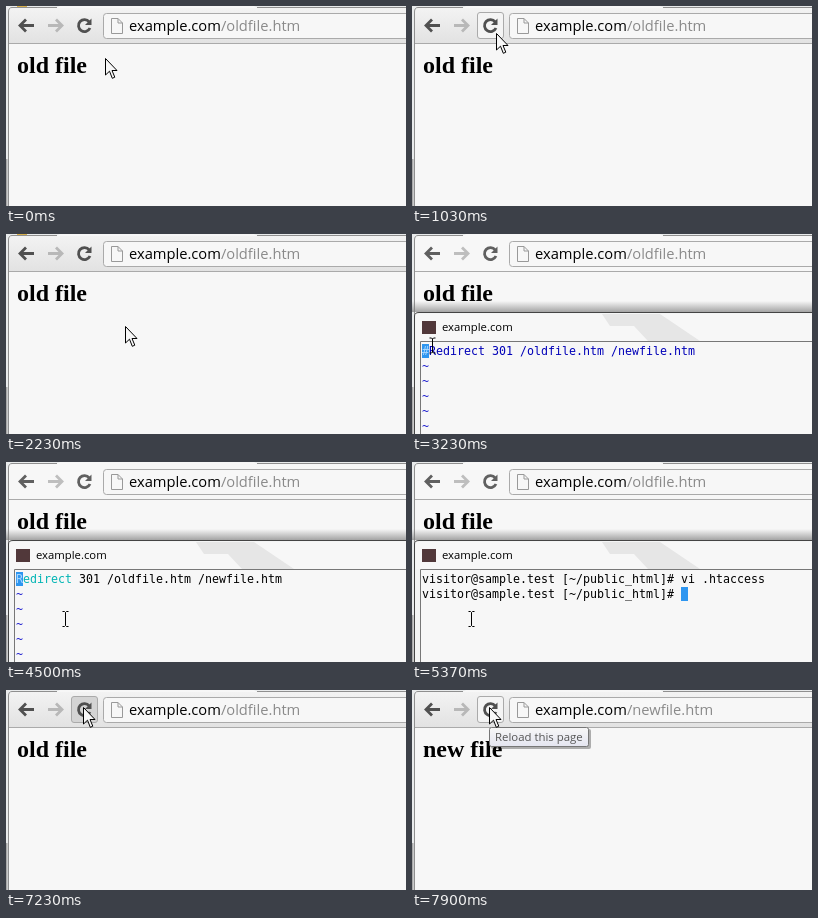
These frames come from a looping animation (400 by 200 pixels, 8170 ms). An HTML page:

```html
<!DOCTYPE html>
<html lang="en">
<head>
<meta charset="utf-8">
<title>Redirect and reload</title>
<style>
  html, body { margin: 0; width: 100%; height: 100%; overflow: hidden; background: #f7f7f7; }
  svg { display: block; width: 400px; height: 200px; }
  text { white-space: pre; }
  .ui { font-family: "Open Sans", "Noto Sans", sans-serif; }
  .heading { font: bold 24px "Liberation Serif", serif; }
  .mono { font: 11.63px "DejaVu Sans Mono", monospace; }
</style>
</head>
<body>
<svg viewBox="0 0 400 200">
  <defs>
    <linearGradient id="bar" x2="0" y2="1"><stop stop-color="#f3f3f3"/><stop offset="1" stop-color="#e2e2e2"/></linearGradient>
    <linearGradient id="shade" x2="0" y2="1"><stop stop-color="#777" stop-opacity="0"/><stop offset="1" stop-color="#777" stop-opacity=".65"/></linearGradient>
    <linearGradient id="tip" x2="0" y2="1"><stop stop-color="#f7f7f7"/><stop offset="1" stop-color="#e4e5f0"/></linearGradient>
  </defs>

  <!-- browser -->
  <rect width="400" height="200" fill="#e9ebec"/>
  <path d="M0 153h1.5v47H0z" fill="#aaa"/>
  <path d="M3 200V6Q3 2 6 2H50L54 0H248L252 2H400V200Z" fill="#f7f7f7"/>
  <path id="favicon" d="M11 0h10v1H11z" fill="#d8b04c"/>
  <path id="toolbar" d="M3 37V6Q3 2 6 2H400V37Z" fill="url(#bar)"/>
  <path d="M2.5 200V6Q2.5 1.5 6 1.5H51M251 1.5H400" fill="none" stroke="#8f8f8f"/>
  <path d="M3 37.5H400" stroke="#aaa"/>
  <rect id="button" x="65.5" y="6.5" width="26" height="26" rx="2.5" stroke="#aaa"/>
  <g id="icons" fill="none" stroke="#505050" stroke-width="2.8">
    <path d="M28 19.5H15M20 13.5L14 19.5 20 25.5"/>
    <path d="M42 19.5H55M50 13.5L56 19.5 50 25.5" stroke="#b8b8b8"/>
    <path d="M83.2 15.8A6 6 0 1 0 84 22"/>
    <path d="M85.5 12.5V19H79Z" fill="#505050" stroke="none"/>
  </g>
  <rect x="97.5" y="7.5" width="310" height="25" rx="3" fill="#f7f7f7" stroke="#aaa"/>
  <path d="M105.5 12.5H112L116.5 17V27.5H105.5ZM112 12.5V17H116.5" fill="#f7f7f7" stroke="#999"/>
  <text class="ui" x="123" y="25" font-size="14.7">example.com<tspan id="path" fill="#8a8a8a"></tspan></text>
  <text id="heading" class="heading" x="11" y="67"></text>

  <!-- terminal -->
  <g id="terminal">
    <rect y="67" width="400" height="11" fill="url(#shade)"/>
    <path d="M2.5 210V82Q2.5 78.5 7 78.5H410V210Z" fill="#f4f5f5" stroke="#444"/>
    <rect x="4" y="80" width="396" height="27" fill="#f7f7f7"/>
    <path d="M190 80H248L288 107H236L222 92H198Z" fill="#e6e6e6"/>
    <rect x="10" y="87" width="14" height="13" fill="#51383a"/>
    <text class="ui" x="30" y="97" font-size="11.3">example.com</text>
    <path d="M8.5 210V107.5H410V210" fill="#f7f7f7" stroke="#777"/>
    <rect id="block" width="7" height="14" fill="#2e96f0"/>
    <g class="mono" id="screen"></g>
  </g>

  <g id="tooltip">
    <rect x="79" y="39" width="100" height="20" rx="2" fill="#000" opacity=".3"/>
    <rect x="77.5" y="37.5" width="99" height="19" rx="2" fill="url(#tip)" stroke="#777"/>
    <text class="ui" x="83" y="51" font-size="11.4" fill="#555">Reload this page</text>
  </g>

  <path id="arrow" d="M.5.5V17L4.5 13.2 7.3 20.3 9.8 19.2 7 12.5H12Z" fill="#f7f7f7" stroke="#000"/>
  <path id="beam" d="M-3-7.5H-1L0-6.500 1-7.500H3M0-6.500V6.500M-3 7.500H-1L0 6.500 1 7.500H3" fill="none" stroke="#000"/>
</svg>
<script>
const LOOP = 8170;
const $ = id => document.getElementById(id);
const show = (id, visible) => $(id).setAttribute("visibility", visible ? "visible" : "hidden");
const set = (id, name, value) => $(id).setAttribute(name, value);

// Each move: first step, last step, number of steps, end position
const start = [99, 52];
const moves = [
  [100, 500, 7, [84, 27]],
  [1700, 2230, 8, [119, 92]],
  [2900, 3030, 3, [64.5, 131.5]],
  [3170, 3230, 2, [20.5, 111.5]],
  [3500, 3700, 4, [59.5, 157]],
  [6170, 6500, 6, [112, 25]],
  [6570, 6970, 7, [77, 17]]
];

function pointer(t) {
  let from = start;
  for (const [first, last, steps, to] of moves) {
    if (t < first) return from;
    const interval = (last - first) / (steps - 1);
    const step = Math.floor((t - first) / interval + 1.01);
    if (step < steps) {
      const p = step / steps, eased = p * p * (3 - 2 * p);
      return from.map((v, i) => Math.round(v + (to[i] - v) * eased));
    }
    from = to;
  }
  return from;
}

const tildes = [1, 2, 3, 4, 5].map(row => [0, row, "~", "#2020d0"]);
const rule = " 301 /oldfile.htm /newfile.htm";
const prompt = "visitor@sample.test [~/public_html]# ";
const screens = [
  { until: 4500, block: [0, 0], runs: [[0, 0, "#", "#a8d8ff"], [1, 0, "Redirect" + rule, "#0000b8"], ...tildes] },
  { until: 5370, block: [0, 0], runs: [[0, 0, "R", "#a8d8ff"], [1, 0, "edirect", "#00b4b4"], [8, 0, rule, "#000"], ...tildes] },
  { until: LOOP, block: [37, 1], runs: [[0, 0, prompt + "vi .htaccess", "#000"], [0, 1, prompt, "#000"]] }
];
let current;

function drawScreen(screen) {
  if (screen === current) return;
  current = screen;
  const [column, row] = screen.block;
  set("block", "x", 10 + column * 7);
  set("block", "y", 110 + row * 15);
  $("screen").innerHTML = screen.runs.map(([col, line, text, color]) =>
    `<text x="${10 + col * 7}" y="${121 + line * 15}" fill="${color}">${text}</text>`).join("");
}

function draw(t) {
  const terminal = t >= 2370 && t < 7230;
  const [x, y] = pointer(t);
  const hover = x >= 65 && x < 92 && y >= 6 && y < 33;
  const pressed = (t >= 830 && t < 1030) || (t >= 7230 && t < 7430);
  const beam = terminal && y > 107;

  show("terminal", terminal);
  drawScreen(screens.find(s => t < s.until));
  set("toolbar", "fill", terminal ? "#f7f7f7" : "url(#bar)");
  set("icons", "opacity", terminal ? 0.9 : 1);
  show("favicon", t < 830 || (t >= 1700 && t < 2370));
  show("button", hover);
  set("button", "fill", pressed ? "#d4d4d4" : "#f4f4f4");
  $("path").textContent = t < 7370 ? "/oldfile.htm" : "/newfile.htm";
  $("heading").textContent = t < 7430 ? "old file" : "new file";
  show("tooltip", t >= 7900);
  show("arrow", !beam);
  show("beam", beam);
  set(beam ? "beam" : "arrow", "transform", `translate(${x} ${y})`);
}

const origin = performance.now();
function frame() {
  draw((performance.now() - origin) % LOOP);
  requestAnimationFrame(frame);
}
frame();
</script>
</body>
</html>
```
